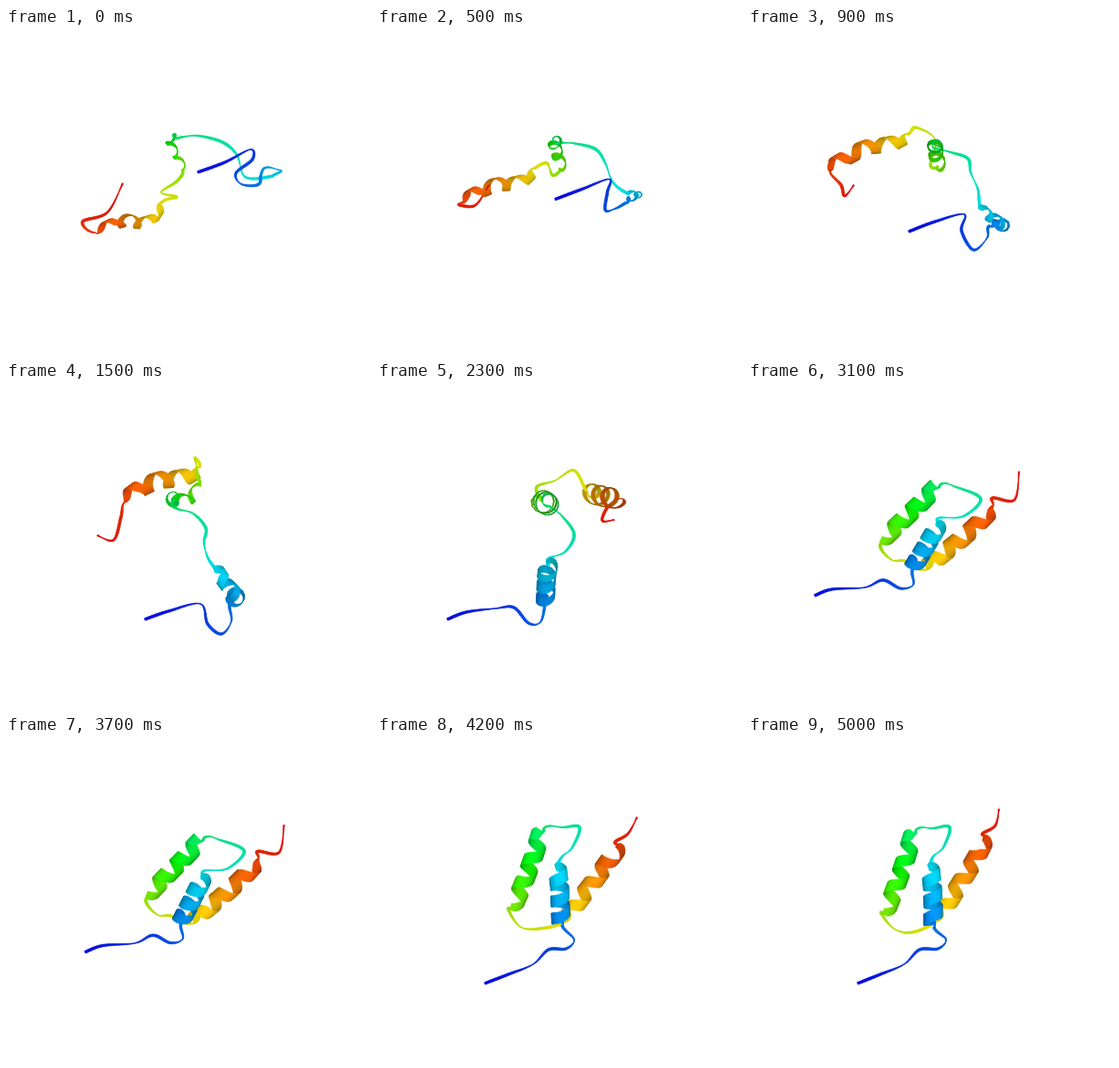
Recreate the animation shown at these times as an HTML page with a canvas. Size 400 by 357 pixels, loop 5500 ms.

```html
<!DOCTYPE html>
<html lang="en">
<head>
<meta charset="utf-8">
<title>Protein folding</title>
<style>
  html, body { margin: 0; width: 100%; height: 100%; overflow: hidden; background: #fff; }
  canvas { display: block; }
</style>
</head>
<body>
<canvas id="stage" width="400" height="357"></canvas>
<script>
const ctx = document.getElementById('stage').getContext('2d');
const LOOP = 5500, STEP = 100, LAST = 5000;
const KNOTS = 29, SAMPLES = 22, RADIUS = 10, HALF_WIDTH = 6.5, TURNS = 3.5;

// Knot range, full length, starting phase, tilt direction and depth of each helix.
const helices = [
  { from: 6, to: 9, length: 70, phase: Math.PI / 2, tilt: 1, depth: 30 },
  { from: 14, to: 17, length: 94, phase: -Math.PI / 2, tilt: -1, depth: 0 },
  { from: 21, to: 25, length: 105, phase: Math.PI / 2, tilt: 1, depth: -30 }
];
const hueStops = [[0, 240], [6, 210], [9, 183], [14, 148], [17, 85], [21, 58], [25, 14], [28, 0]];

// A pose: x, y of every knot on the chain axis, then how far each helix is wound.
const poses = [];
const addPose = (time, wound, points) => poses.push({ time, values: [...points, ...wound] });

addPose(0, [0.05, 0.4, 0.7], [
  210,158, 240,147, 268,133, 270,144, 252,159, 258,171,
  277,171, 282,154, 301,156, 288,163, 262,163, 253,139, 237,125, 210,118,
  190,120, 179,122, 186,138, 194,156, 187,168, 170,180, 187,185,
  172,190, 157,212, 140,212, 124,212, 97,224, 84,212, 111,202, 128,170]);
addPose(900, [0.6, 0.8, 0.85], [
  176,223, 205,212, 237,204, 234,222, 247,243, 262,230,
  264,217, 280,216, 268,208, 255,197, 252,177, 244,158, 241,143, 222,136,
  207,132, 205,128, 206,138, 208,152, 200,150, 205,122, 184,109,
  176,116, 156,127, 133,130, 110,141, 90,156, 102,172, 106,184, 116,172]);
addPose(1500, [0.8, 0.6, 0.95], [
  152,260, 178,251, 213,243, 221,265, 236,276, 247,262,
  245,244, 253,235, 242,222, 229,204, 221,192, 217,176, 219,160, 205,144,
  186,138, 183,126, 200,129, 212,112, 210,104, 209,93, 207,83,
  212,93, 193,105, 172,107, 150,115, 130,131, 126,148, 118,173, 100,168]);
addPose(2300, [1, 1.2, 1.1], [
  77,260, 98,252, 130,248, 150,247, 166,264, 179,263,
  184,244, 185,228, 186,212, 188,200, 188,193, 206,186, 216,167, 203,147,
  189,136, 186,133, 183,131, 180,130, 175,115, 195,108, 216,97,
  230,120, 239,123, 247,125, 256,127, 263,128, 252,138, 247,152, 260,151]);
const folded = [
  73,234, 92,227, 128,225, 148,217, 167,226, 181,222,
  180,206, 189,190, 199,173, 208,157, 209,149, 236,147, 255,128, 228,115,
  211,112, 190,132, 168,153, 148,173, 146,183, 158,195, 172,196,
  191,205, 211,190, 231,174, 250,157, 268,137, 268,127, 292,129, 297,98];
addPose(3100, [1, 1, 1], folded);
addPose(3600, [1, 1, 1], folded.map((v, i) => i % 2 ? v : v + 9));
addPose(4200, [1, 1, 1], [
  118,271, 144,261, 171,250, 188,234, 207,233, 216,223,
  203,208, 201,187, 200,165, 198,143, 203,132, 214,122, 222,100, 204,100,
  183,101, 172,131, 161,160, 149,187, 144,190, 157,209, 178,211,
  204,204, 220,182, 237,160, 253,138, 264,122, 261,116, 275,107, 285,89]);
addPose(5000, [1, 1, 1], [
  120,271, 145,261, 171,250, 188,234, 208,233, 217,223,
  204,210, 203,188, 202,165, 200,143, 203,132, 214,122, 221,100, 203,101,
  184,103, 173,134, 162,165, 151,192, 146,194, 160,211, 180,215,
  206,203, 221,180, 236,156, 250,133, 260,112, 257,107, 271,98, 275,80]);

const clamp = v => Math.max(0, Math.min(1, v));
const mix = (a, b, t) => a + (b - a) * t;
const smooth = t => t * t * (3 - 2 * t);

function hermite(a, b, ma, mb, t) {
  return mix(a, b, smooth(t)) + t * (1 - t) * ((1 - t) * ma - t * mb);
}

// Monotone interpolation in time: no overshoot past a pose.
function poseAt(time) {
  let k = 0;
  while (k < poses.length - 2 && time >= poses[k + 1].time) k++;
  const a = poses[k], b = poses[k + 1], span = b.time - a.time;
  const slope = (j, i) => poses[j] && poses[j + 1]
    ? (poses[j + 1].values[i] - poses[j].values[i]) / (poses[j + 1].time - poses[j].time) : 0;
  const tangent = (j, i) => {
    const p = slope(j - 1, i), q = slope(j, i);
    return p * q > 0 ? 2 * p * q / (p + q) * span : 0;
  };
  return a.values.map((v, i) =>
    hermite(v, b.values[i], tangent(k, i), tangent(k + 1, i), (time - a.time) / span));
}

function hueAt(u) {
  const i = Math.max(1, hueStops.findIndex(s => s[0] >= u));
  const [u0, h0] = hueStops[i - 1], [u1, h1] = hueStops[i];
  return mix(h0, h1, (u - u0) / (u1 - u0));
}

function axisPoint(values, u) {
  const k = Math.min(KNOTS - 2, Math.floor(u)), t = u - k;
  return [0, 1].map(axis => {
    const at = i => values[2 * Math.max(0, Math.min(KNOTS - 1, i)) + axis];
    return hermite(at(k), at(k + 1), (at(k + 1) - at(k - 1)) / 2, (at(k + 2) - at(k)) / 2, t);
  });
}

function ribbonPoint(values, u) {
  let [x, y] = axisPoint(values, u);
  const n = helices.findIndex(h => u >= h.from && u <= h.to);
  const point = { x, y, z: -u, u, ex: 0, ey: 0, blend: 0, shade: 0.87 };
  if (n < 0) return point;

  const helix = helices[n], wound = values[2 * KNOTS + n];
  const knots = helix.to - helix.from, part = (u - helix.from) / knots;
  const [x0, y0] = axisPoint(values, u - 0.1), [x1, y1] = axisPoint(values, u + 0.1);
  const speed = Math.hypot(x1 - x0, y1 - y0) || 1;
  const tx = (x1 - x0) / speed, ty = (y1 - y0) / speed;
  const flat = Math.min(1, speed * 5 * knots / helix.length);
  const toward = helix.tilt * Math.sqrt(1 - flat * flat);
  const phi = helix.phase + part * TURNS * 2 * Math.PI;
  const ramp = smooth(clamp(Math.min(part, 1 - part) / 0.1));
  const side = RADIUS * wound * ramp * Math.sin(phi);
  const front = RADIUS * wound * ramp * Math.cos(phi);
  const facing = Math.cos(phi) * flat;

  point.x += -ty * side - tx * toward * front;
  point.y += tx * side - ty * toward * front;
  point.z = helix.depth + front * flat + 20 * toward * part;
  point.ex = tx * HALF_WIDTH * flat;
  point.ey = ty * HALF_WIDTH * flat;
  point.blend = ramp * Math.min(1, wound);
  point.shade = mix(0.87, (0.58 + 0.42 * Math.abs(facing)) * (facing < 0 ? 0.92 : 1), point.blend);
  return point;
}

function draw(time) {
  const values = poseAt(time), points = [];
  for (let i = 0; i <= (KNOTS - 1) * SAMPLES; i++) points.push(ribbonPoint(values, i / SAMPLES));

  points.forEach((p, i) => {
    const a = points[Math.max(0, i - 1)], b = points[Math.min(points.length - 1, i + 1)];
    const dx = b.x - a.x, dy = b.y - a.y, d = Math.hypot(dx, dy) || 1;
    const width = 0.35 + 1.1 * Math.abs(Math.sin(p.u * 1.1 + 1));
    p.ex = mix(-dy / d * width, p.ex, p.blend);
    p.ey = mix(dx / d * width, p.ey, p.blend);
  });

  ctx.fillStyle = '#fff';
  ctx.fillRect(0, 0, 400, 357);
  ctx.lineWidth = 0.6;
  ctx.lineJoin = 'round';
  points.slice(1).map((b, i) => [points[i], b])
    .sort((p, q) => p[0].z + p[1].z - q[0].z - q[1].z)
    .forEach(([a, b]) => {
      ctx.fillStyle = ctx.strokeStyle = `hsl(${hueAt(a.u)}, 100%, ${50 * a.shade}%)`;
      ctx.beginPath();
      ctx.moveTo(a.x - a.ex, a.y - a.ey);
      ctx.lineTo(b.x - b.ex, b.y - b.ey);
      ctx.lineTo(b.x + b.ex, b.y + b.ey);
      ctx.lineTo(a.x + a.ex, a.y + a.ey);
      ctx.closePath();
      ctx.fill();
      ctx.stroke();
    });
}

function tick() {
  const time = performance.now() % LOOP;
  draw(Math.min(LAST, Math.floor(time / STEP) * STEP));
  requestAnimationFrame(tick);
}
tick();
</script>
</body>
</html>
```
